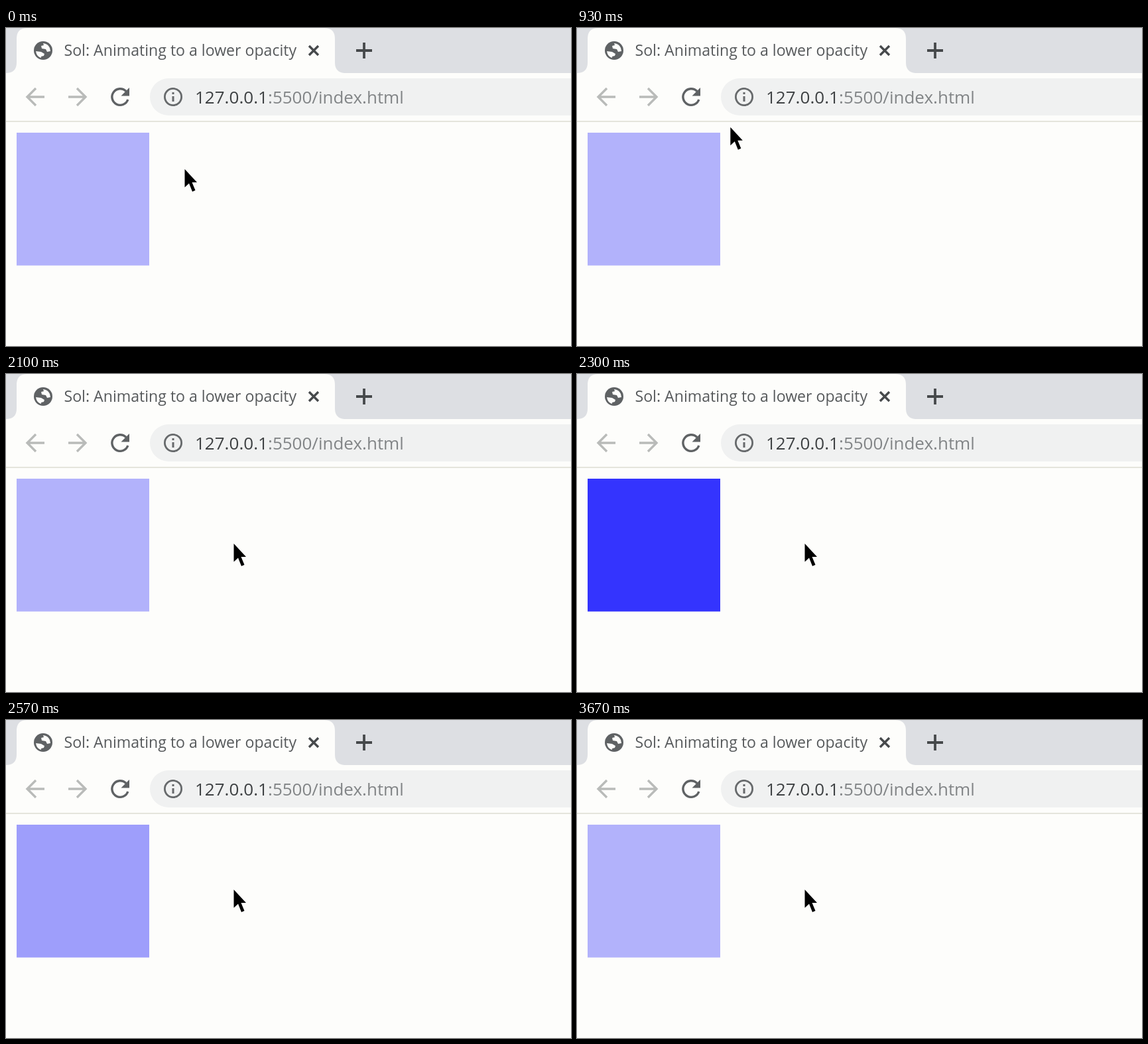
Animation, 852 px wide and 480 px high, one loop 3.99 s. Source, as an HTML page:

```html
<!DOCTYPE html>
<html lang="en">
<head>
<meta charset="utf-8">
<title>Animating to a lower opacity</title>
<style>
  html, body { margin: 0; width: 100%; height: 100%; overflow: hidden; background: #fdfdfb; }
  svg { display: block; width: 100%; height: 100%; }
  text { font-family: "Open Sans", "Noto Sans", sans-serif; }
  .line { fill: none; stroke-width: 3.4; }
</style>
</head>
<body>
<svg viewBox="0 0 852 480">
  <rect width="852" height="480" fill="#fdfdfb"/>

  <!-- tab strip -->
  <rect width="852" height="68" fill="#dddfe3"/>
  <path fill="#fdfdfb" d="M0 68Q16 68 16 52V16Q16 0 32 0H480Q496 0 496 16V52Q496 68 512 68Z"/>
  <g id="globe">
    <circle cx="56" cy="34" r="14" fill="#5f6264"/>
    <path fill="#fdfdfb" d="M56 23Q63 23.500 66 30L67 35L62 36L60 32L54 31L53 27L57 26ZM45 35L53 36L58 39L57 42L53 43V45Q46 43 45 35Z"/>
  </g>
  <path id="spinner" class="line" stroke="#8c8f91"/>
  <text x="87.500" y="42" font-size="23.100" fill="#56595b">Sol: Animating to a lower opacity</text>
  <g class="line" stroke="#46494b">
    <path d="M457 27l14 14M471 27l-14 14"/>
    <path stroke-width="3.8" d="M528 34h24M540 22v24"/>
  </g>

  <!-- toolbar -->
  <g class="line" stroke="#b9bbb9">
    <path d="M58 104H32M45 91L32 104L45 117"/>
    <path d="M94 104H120M107 91L120 104L107 117"/>
  </g>
  <circle id="hover" cx="172" cy="104" r="28" fill="#dddfe0"/>
  <path class="line" stroke="#5f6264" d="M181 95.500A12.300 12.300 0 1 0 183.800 108"/>
  <path fill="#5f6264" d="M186 90V102.500H173.500Z"/>
  <path fill="#f0f1f1" d="M852 76H245a28 28 0 0 0 0 56H852Z"/>
  <circle class="line" cx="252" cy="104" r="12.600" stroke="#66696b" style="stroke-width:2.8"/>
  <path fill="#66696b" d="M250.500 97h3v3h-3ZM250.500 103h3v8h-3Z"/>
  <text x="285" y="114" font-size="26" fill="#3e4143">127.0.0.1<tspan fill="#828587">:5500/index.html</tspan></text>
  <rect y="140" width="852" height="2" fill="#e5e5dc"/>

  <!-- page -->
  <rect id="box" x="16" y="158" width="200" height="200.500"/>
  <path id="cursor" d="M-.5 0V27.500L6 21.500L11 34L15.500 32L10.500 20H18Z"/>
</svg>
<script>
  const LOOP = 3990;
  const CLICK = 1600, ICON_BACK = 1930;
  const FADE_START = 2170, FADE_TIME = 660;
  const FULL = [0, 0, 255], FADED = [178, 178, 251];

  // time, x, y of the pointer tip
  const path = [
    [0, 270, 213], [350, 270, 213], [930, 232, 150], [1250, 178, 106],
    [1550, 178, 106], [1630, 222, 141], [1780, 300, 215], [1930, 344, 256]
  ];

  const $ = id => document.getElementById(id);
  const globe = $('globe'), spinner = $('spinner'), hover = $('hover');
  const box = $('box'), cursor = $('cursor');

  const clamp = v => Math.max(0, Math.min(1, v));
  const lerp = (a, b, p) => a + (b - a) * p;

  // CSS "ease": cubic-bezier(.25, .1, .25, 1)
  function ease(x) {
    const bezier = (a, b, u) => 3 * a * u * (1 - u) ** 2 + 3 * b * u * u * (1 - u) + u ** 3;
    let low = 0, high = 1;
    for (let i = 0; i < 20; i++) {
      const mid = (low + high) / 2;
      if (bezier(.25, .25, mid) < x) low = mid; else high = mid;
    }
    return bezier(.1, 1, low);
  }

  function pointerAt(t) {
    const next = path.findIndex(k => k[0] > t);
    if (next < 0) return path[path.length - 1].slice(1);
    const a = path[next - 1], b = path[next];
    const p = (t - a[0]) / (b[0] - a[0]);
    return [lerp(a[1], b[1], p), lerp(a[2], b[2], p)];
  }

  function arc(from, sweep) {
    const point = deg => {
      const r = deg * Math.PI / 180;
      return `${56 + 14 * Math.cos(r)} ${34 + 14 * Math.sin(r)}`;
    };
    return `M${point(from)}A14 14 0 ${sweep > 180 ? 1 : 0} 0 ${point(from - sweep)}`;
  }

  function render(t) {
    const loading = t >= CLICK && t < ICON_BACK;
    globe.style.display = loading ? 'none' : '';
    spinner.style.display = loading ? '' : 'none';
    if (loading) spinner.setAttribute('d', arc(-48, Math.min(270, (t - CLICK) * .9)));

    hover.setAttribute('opacity', clamp((t - 1130) / 130) * clamp((1800 - t) / 150));

    const fade = t < FADE_START ? 1 : ease(clamp((t - FADE_START) / FADE_TIME));
    const mixed = FULL.map((c, i) => Math.round(lerp(c, FADED[i], fade)));
    box.setAttribute('fill', `rgb(${mixed})`);

    cursor.setAttribute('transform', `translate(${pointerAt(t)})`);
  }

  const start = performance.now();
  function tick() {
    render((performance.now() - start) % LOOP);
    requestAnimationFrame(tick);
  }
  tick();
</script>
</body>
</html>
```
